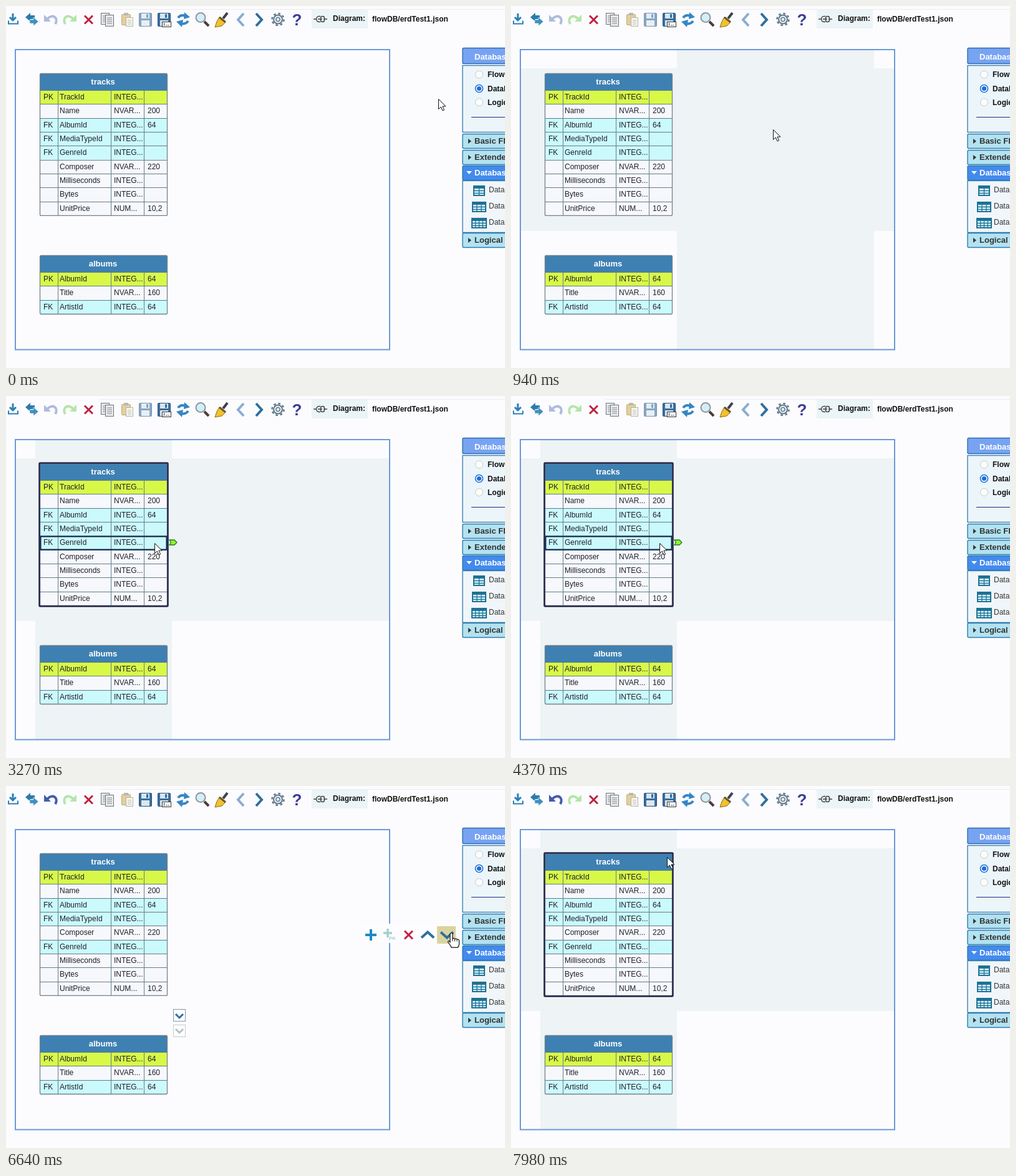
These frames come from a looping animation (800x581 px, 8 s). An HTML page:

```html
<!DOCTYPE html>
<html lang="en">
<head>
<meta charset="utf-8">
<title>Diagram editor</title>
<style>
html, body { margin: 0; width: 100%; height: 100%; overflow: hidden; background: #fcfcfe; }
svg { display: block; width: 100%; height: 100%; font-family: "Liberation Sans", Arial, sans-serif; }
text { white-space: pre; }
</style>
</head>
<body>
<svg id="stage" viewBox="0 0 800 581"></svg>
<script>
const LOOP = 8000, OPEN = 4500, MOVED = 6600, CLOSED = 6690;
const NAVY = '#1b1b4b', BLUE = '#78a3f2', STEEL = '#2f6f9e', CYAN = '#cbfafc', LIME = '#d8f848', BAND = '#eef3f5';

const rect = (x, y, w, h, fill, stroke = 'none', sw = 1, rx = 0) =>
  `<rect x="${x}" y="${y}" width="${w}" height="${h}" rx="${rx}" fill="${fill}" stroke="${stroke}" stroke-width="${sw}"/>`;
const line = (d, stroke, sw = 1, extra = '') =>
  `<path d="${d}" fill="none" stroke="${stroke}" stroke-width="${sw}" ${extra}/>`;
const shape = (d, fill, stroke = 'none', sw = 1) =>
  `<path d="${d}" fill="${fill}" stroke="${stroke}" stroke-width="${sw}"/>`;
const circle = (x, y, r, fill, stroke = 'none', sw = 1, extra = '') =>
  `<circle cx="${x}" cy="${y}" r="${r}" fill="${fill}" stroke="${stroke}" stroke-width="${sw}" ${extra}/>`;
const text = (x, y, s, fill = '#20202c', size = 12, extra = '') =>
  `<text x="${x}" y="${y}" fill="${fill}" font-size="${size}" ${extra}>${s}</text>`;
const bold = (x, y, s, fill = '#111', size = 12, extra = '') =>
  text(x, y, s, fill, size, 'font-weight="bold" ' + extra);
const group = (id, body) => `<g id="${id}">${body}</g>`;
const cross = (x, y) => line(`M${x - 6.5} ${y - 6.5}l13 13m0-13l-13 13`, '#c0203f', 3);
const chevron = (x, y, w, h, color, sw) => line(`M${x - w} ${y - h / 2}l${w} ${h} ${w} ${-h}`, color, sw);

// Toolbar
const floppy = x => rect(x + .5, 11.5, 20, 21, '#3c6e9e', '#23507a', 1, 1) +
  rect(x + 4, 12, 13, 8, '#d7e6ef') + rect(x + 12, 13, 3, 6, STEEL) + rect(x + 4, 23, 13, 9, '#dde7ee');
const sheet = (x, y) => rect(x + .5, y + .5, 13, 18, '#e9ebec', '#70757a') +
  line(`M${x + 3} ${y + 5}h8m-8 3h8m-8 3h8m-8 3h8`, '#84898e');

function toolbar() {
  return line('M150 5.5H800', '#ececee') + rect(490, 6, 90, 30, '#ebf4f7') +
    line('M11 12V22M6 18l5 5 5-5', '#2b7fb6', 3) + line('M4 23.5v5h15v-5', '#2b7fb6', 2) +
    shape('M31 18l8-7v4h7v6h-7v4z', '#2b7cab') + shape('M52 25l-8 7v-4h-6v-6h6v-4z', '#4090bd', '#fcfcff', .6) +
    group('undo', line('M79 29C85 18 74 12 66 21', '#3f5cae', 4) + shape('M61 14v11h11z', '#3f5cae')) +
    `<g opacity=".5">${line('M95 29C89 18 100 12 108 21', '#6ecf55', 4) + shape('M113 14v11h-11z', '#6ecf55')}</g>` +
    cross(132.5, 22) + sheet(152, 11) + sheet(159, 14) +
    rect(185.5, 13.5, 14, 17, '#e3cf9e', '#c3ab72', 1, 1) + rect(189, 11, 7, 4, '#b9b9ae') +
    rect(192.5, 18.5, 11, 14, '#f5f5ee', '#b5b5a8') + line('M195 23h6m-6 3h6m-6 3h6', '#bbb') +
    group('save', floppy(213)) + floppy(243) +
    rect(250.5, 25.5, 14, 8, '#fff', '#333') + line('M253.5 27v5m3-1h2m1 0h2', '#333') +
    line('M276 19q4-6 12-3M292 24q-4 6-12 4', '#3686c4', 4) +
    shape('M286 10l9 8-10 3zM282 34l-9-9 11-3z', '#3686c4') +
    line('M318 25l7 7', '#4a3c39', 4) + circle(312, 18.5, 7.5, '#d5edf7', '#8b979e', 2) +
    line('M355 11l-7 9', '#3c414e', 4) + shape('M342 18l10 8-6 6-11 2 3-9z', '#f2c12e', '#8c6913') +
    line('M342 18l10 8', '#6d5427', 3) +
    line('M381 12l-9 10 9 10', '#8babd0', 4) + line('M401 12l9 10-9 10', STEEL, 4) +
    circle(436, 21.5, 7, '#e6edf2', '#61798c', 2) +
    circle(436, 21.5, 9.5, 'none', '#61798c', 2.6, 'stroke-dasharray="3.6 3.86"') +
    circle(436, 21.5, 3, '#fff', '#61798c', 1.5) +
    bold(458.5, 31, '?', '#3b3d98', 26) +
    line('M493 21h5m11 0h6M504 16.5h-2a4.5 4.5 0 0 0 0 9h2M500 21h7', '#444', 1.5) +
    rect(504.5, 16.5, 6, 9, 'none', '#444', 1.5, 3) +
    bold(524, 24, 'Diagram:') + bold(587, 25, 'flowDB/erdTest1.json');
}

// Tables
const TRACKS = [
  ['PK', 'TrackId', 'INTEG...', ''], ['', 'Name', 'NVAR...', '200'], ['FK', 'AlbumId', 'INTEG...', '64'],
  ['FK', 'MediaTypeId', 'INTEG...', ''], ['FK', 'GenreId', 'INTEG...', ''], ['', 'Composer', 'NVAR...', '220'],
  ['', 'Milliseconds', 'INTEG...', ''], ['', 'Bytes', 'INTEG...', ''], ['', 'UnitPrice', 'NUM...', '10,2']];
const REORDERED = TRACKS.map((row, i) => TRACKS[{ 4: 5, 5: 4 }[i] ?? i]);
const ALBUMS = [['PK', 'AlbumId', 'INTEG...', '64'], ['', 'Title', 'NVAR...', '160'], ['FK', 'ArtistId', 'INTEG...', '64']];
const ROW = 22.33, FILLS = { PK: LIME, FK: CYAN, '': '#f7f8fb' };

function table(y, title, rows) {
  const top = y + 26, h = rows.length * ROW, grid = '#627c8c';
  return rect(55, y, 203, 26, '#3e80b2') +
    bold(155.5, y + 17, title, '#fff', 13, 'text-anchor="middle"') +
    rows.map((row, i) => {
      const ry = top + i * ROW;
      return rect(55, ry, 203, ROW, FILLS[row[0]]) +
        line(`M55 ${Math.round(ry) + .5}h203`, grid) +
        row.map((cell, c) => text([60, 86, 173, 227][c], Math.round(ry + 15), cell)).join('');
    }).join('') +
    line(`M83.5 ${top}v${h}M168.5 ${top}v${h}M221.5 ${top}v${h}`, grid) +
    rect(54.5, y - .5, 204, 27 + h, 'none', '#74818c', 1.3, 2);
}

// Side panel
function panel() {
  const bar = (y, label, fill, color, arrow) => rect(732, y + .5, 80, 23, fill, '#2d7cae', 1.4, 2) +
    shape(arrow, color) + bold(751, y + 15.5, label, color, 13);
  const closed = y => `M741 ${y + 8}l5 4-5 4z`;
  const radio = (y, label, on) =>
    circle(758.5, y, 6, '#fdfdfb', on ? '#1c6fdc' : '#c3cbc8', on ? 1.6 : 1) +
    (on ? circle(758.5, y, 3.6, '#1c6fdc') : '') + bold(772, y + 4, label);
  const item = (x, y, w, cols) => {
    let d = `M${x} ${y + 7.5}h${w}m0 4h-${w}`;
    for (let i = 1; i < cols; i++) d += `M${x + i * w / cols} ${y}v15`;
    return rect(x, y, w, 15, '#e4f6fa', '#1b7396', 2) + rect(x, y, w, 4, '#1b7396') +
      line(d, '#1b7396', 1.3) + text(774, y + 10, 'Data', '#333');
  };
  return rect(732, 67.5, 80, 25, BLUE, '#2d6fae', 1.4, 2) + bold(751, 86, 'Database', '#fff', 13) +
    rect(732, 95.5, 80, 107, '#ecf5fa', '#3c80b4', 1.4) +
    radio(110, 'Flow') + radio(132.5, 'Database', true) + radio(154.5, 'Logical') +
    line('M746 178.5h54', '#1d2b80', 1.2) +
    bar(205, 'Basic Flow', '#b3e2f0', '#333', closed(205)) + bar(231, 'Extended', '#b3e2f0', '#333', closed(231)) +
    rect(732, 280.5, 80, 83, '#f1f6fa', '#3c80b4', 1.4) +
    bar(256, 'Database', '#438aef', '#fff', 'M738 265h9l-4.5 5z') +
    item(750, 289, 17, 2) + item(748, 315, 21, 3) + item(747, 341, 23, 4) +
    bar(364, 'Logical', '#b3e2f0', '#333', closed(364));
}

// Dialog
function check(x, on) {
  return rect(x - 6.5, 303.5, 13, 13, on ? '#1c6fdc' : '#cfcfc0', 'none', 1, 2) +
    line(`M${x - 3.5} 310l2.5 3 4.5-6`, on ? '#fff' : '#90928c', 2);
}
function dialogBody() {
  const cols = [[266, 47, 'Key', 272], [315, 216, 'Column', 320], [533, 137, 'Data Type', 539], [672, 56, 'Lengt', 677]];
  const field = (x, w, color, s, size) => rect(x + .5, 325.5, w, 21, '#fff', color, 1.3, 2) + text(x + 5, 340, s, '#222', size);
  return rect(263, 218, 467, 225, '#f5f8fe', NAVY, 2) + rect(266, 220, 298, 26, BLUE) +
    bold(272, 238, '&lt;', '#fff') + bold(285, 238, 'tracks / GenreId', '#fff') +
    bold(272, 270, 'Active Columns / Row Content:') +
    cols.map(([x, w, s, tx]) => rect(x, 277, w, 20, BLUE) + rect(x, 298, w, 24, CYAN) +
      bold(tx, 292, s, '#fff', 16, 'font-family="Liberation Serif, Times New Roman, serif"')).join('') +
    check(290) + check(423.5) + check(602, true) + check(700.5, true) +
    field(267, 43, NAVY, 'FK') + field(314, 216, '#6d6d55', 'GenreId', 13.33) +
    field(534, 135, NAVY, 'INTEGER') + field(672, 55, '#6d6d55', '') +
    bold(298, 373, 'Constraints') + bold(298, 398, 'Indexes') +
    rect(580, 411.5, 70, 24, '#f9fbfd', NAVY, 1.3, 2) + text(594, 428, 'Confirm', '#b9b7ae') +
    rect(655, 411.5, 70, 24, '#f9fbfd', NAVY, 1.3, 2) + text(671, 428, 'Cancel', '#111');
}
function dialogIcons() {
  const pale = '#a3cfd4';
  return rect(568, 221, 160, 31, '#fdfdff') + group('hot', rect(691, 225, 30, 28, '#dad3a0')) +
    line('M585 230v18M576 239h18', '#1b8ac2', 4) +
    line('M612 229v14M605 236h14', pale, 3.5) + bold(614, 247, 'PK', pale, 8) +
    cross(645.5, 239) + chevron(676, 239, 10, -9, STEEL, 4) + chevron(707, 239, 10, 9, STEEL, 4) +
    rect(268.5, 358.5, 19, 19, '#fdfdff', '#7d98a8') + chevron(278, 369, 6, 6, STEEL, 3) +
    rect(268.5, 383.5, 19, 19, '#fdfdff', '#c6cdc8') + chevron(278, 393, 6, 6, '#b7c2be', 3);
}

const handles = [53, 156.5, 260].flatMap(x => [107, 222, 338].map(y => [x, y]))
  .filter(([x, y]) => x !== 156.5 || y !== 222)
  .map(([x, y]) => rect(x - 2.5, y - 2.5, 5, 5, '#23495c')).join('');

document.getElementById('stage').innerHTML =
  rect(0, 0, 800, 581, '#fcfcfe') + toolbar() +
  group('bands', rect(16, 100, 598, 261, BAND) + `<rect id="column" y="71" height="480" fill="${BAND}"/>`) +
  rect(15, 70, 600, 481.5, 'none', '#6b9ad6', 2) +
  group('before', table(109, 'tracks', TRACKS)) + group('after', table(109, 'tracks', REORDERED)) +
  table(401, 'albums', ALBUMS) +
  group('outline', rect(53.5, 107.5, 206, 230, 'none', '#26274a', 2.5, 1)) + group('handles', handles) +
  group('activeRow', rect(55.5, 225.5, 202, 21, 'none', '#142a50', 2)) +
  group('port', shape('M262 231h8l4 4-4 4h-8l2.5-4z', '#8dfb2a', '#257a26', 1.3)) +
  panel() + group('dialog', dialogBody()) + group('icons', dialogIcons()) +
  group('pointer',
    group('arrow', shape('M.5 .5v16l3.8-3.5 2.8 6 2.5-1.1-2.7-5.9h5.1z', '#fff', '#111')) +
    group('hand', shape('M-1 2q0-2 2-2t2 2v7q2-1.5 3.5.5 2-1 3.5.7 3-.7 3.5 2v5q0 3-2 6H1q-1-3-5-8-1-3 1.5-2.5l1.5 2z', '#fff', '#111', 1.2) +
      line('M3 9v4m3.5-3.5v4m3.5-3v3', '#111')));

const el = id => document.getElementById(id);
const show = (id, on) => { el(id).style.display = on ? '' : 'none'; };

// time, x, y of the pointer tip
const PATH = [[0, 693, 149], [540, 579, 161], [1300, 278, 231], [1500, 258, 236], [2100, 240, 236], [2400, 238, 236],
  [4750, 238, 236], [5380, 644, 283], [5750, 713, 236], [6700, 713, 236], [7800, 252, 115], [7980, 250, 114], [8000, 250, 114]];

function pointerAt(t) {
  const i = Math.max(1, PATH.findIndex(p => p[0] > t));
  const [a, b] = [PATH[i - 1], PATH[i]], k = (t - a[0]) / (b[0] - a[0]);
  return [a[1] + (b[1] - a[1]) * k, a[2] + (b[2] - a[2]) * k];
}

function render(t) {
  const [x, y] = pointerAt(t);
  const open = t >= OPEN && t < MOVED, icons = t >= OPEN && t < CLOSED, moved = t >= MOVED;
  const free = !icons, onButton = icons && x > 691 && y < 253;
  const onTable = free && x < 262, onRow = onTable && y > 225 && y < 247;

  show('bands', free && x < 615);
  const [left, right] = x >= 578 ? [582, 614] : x >= 266 ? [266, 582] : [47, 266];
  el('column').setAttribute('x', left);
  el('column').setAttribute('width', right - left);

  show('before', !moved);
  show('after', moved);
  show('outline', onTable || open);
  show('handles', open);
  show('activeRow', onRow && x < 256);
  show('port', onRow);
  show('dialog', open);
  show('icons', icons);
  show('hot', onButton);
  show('hand', onButton);
  show('arrow', !onButton);
  el('undo').setAttribute('opacity', moved ? 1 : .4);
  el('save').setAttribute('opacity', moved ? 1 : .6);
  el('pointer').setAttribute('transform', `translate(${Math.round(x)} ${Math.round(y)})`);
}

const start = performance.now();
function tick() {
  render((performance.now() - start) % LOOP);
  requestAnimationFrame(tick);
}
tick();
</script>
</body>
</html>
```
